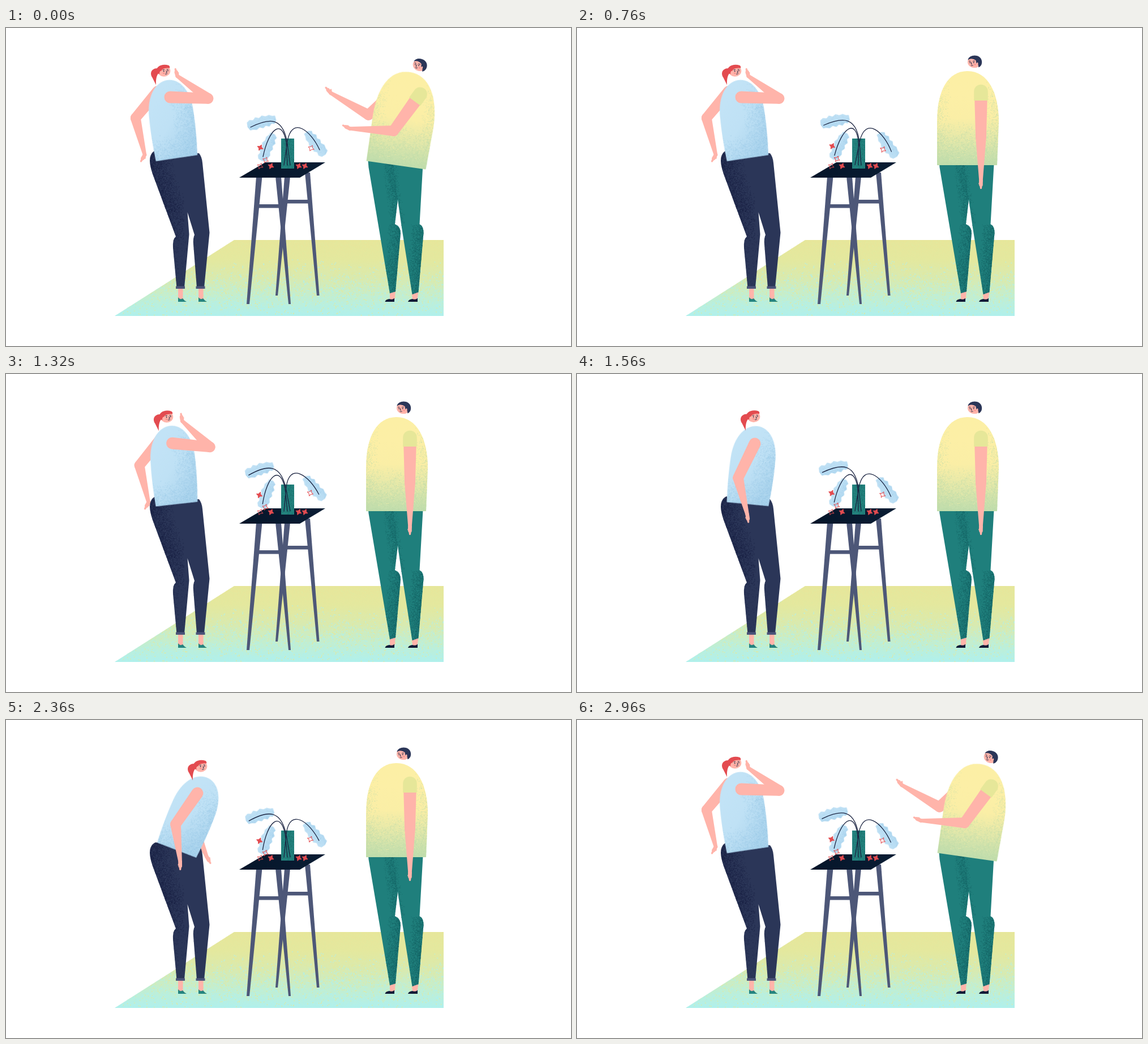
An HTML page with a canvas for the animation above (3 s loop, 998 by 561 pixels).

```html
<!DOCTYPE html>
<html>
<head>
<meta charset="utf-8">
<style>
html, body { margin: 0; width: 998px; height: 561px; overflow: hidden; background: #fff; }
canvas { display: block; }
</style>
</head>
<body>
<canvas id="stage" width="998" height="561"></canvas>
<script>
const W = 998, H = 561, LOOP = 3000, STEP = 40;
const c = document.getElementById('stage').getContext('2d');
const SKIN = '#ffb4aa', NAVY = '#2b3658', RED = '#e34b50', INK = '#1b2441';
const MAN_HIP = [689, 242], WOMAN_HIP = [301.5, 229.5];

let seed = 7;
function rnd() {
  seed = (seed + 0x6D2B79F5) | 0;
  let z = Math.imul(seed ^ (seed >>> 15), 1 | seed);
  z = (z + Math.imul(z ^ (z >>> 7), 61 | z)) ^ z;
  return ((z ^ (z >>> 14)) >>> 0) / 4294967296;
}
const rad = a => a * Math.PI / 180;
const clamp = v => Math.max(0, Math.min(1, v));
const lerp = (a, b, k) => a + (b - a) * k;
const ease = u => u < .5 ? 4 * u ** 3 : 1 - 4 * (1 - u) ** 3;
const ramp = (t, from, to) => ease(clamp((t - from) / (to - from)));

function fill(g, d, color) {
  g.fillStyle = color;
  g.fill(new Path2D(d));
}
function line(g, d, color, width) {
  g.strokeStyle = color;
  g.lineWidth = width;
  g.lineCap = g.lineJoin = 'round';
  g.stroke(new Path2D(d));
}
function fade(g, x0, y0, x1, y1, ...stops) {
  const grad = g.createLinearGradient(x0, y0, x1, y1);
  stops.forEach((s, i) => grad.addColorStop(i / (stops.length - 1), s));
  return grad;
}
function layer(draw) {
  const el = document.createElement('canvas');
  el.width = W;
  el.height = H;
  draw(el.getContext('2d'));
  return el;
}
// Random specks inside shape d; density(x, y) is the chance of each speck.
function grain(g, d, [x, y, w, h], n, color, density, size = 1) {
  g.save();
  g.clip(new Path2D(d));
  g.fillStyle = color;
  for (let i = 0; i < n; i++) {
    const px = x + rnd() * w, py = y + rnd() * h;
    if (rnd() < density(px, py)) g.fillRect(px, py, size, size);
  }
  g.restore();
}

const room = layer(g => {
  const floor = 'M403 374H773V508H192Z';
  fill(g, floor, fade(g, 0, 374, 0, 508, '#e7e69a', '#e4e89e', '#d8eab0', '#c3eecf', '#b0f0ec'));
  const box = [192, 374, 581, 134], depth = y => (y - 374) / 134;
  grain(g, floor, box, 15000, '#b0f0ec', (x, y) => clamp(depth(y) * 1.1 - .25) * .5, 1.5);
  grain(g, floor, box, 12000, '#e2e99f', (x, y) => clamp(1.1 - depth(y)) * .5, 1.5);
  grain(g, floor, box, 2000, '#b9eed8', (x, y) => x < 397 - (y - 374) * 1.4 ? .7 : 0, 1.5);

  const legs = ['M476 262H486L503 487H499Z', 'M492 262H502L480 472H476Z',
    'M528 255H537L553.5 472H549Z', 'M442 262H452.5L430 487H425Z',
    'M446 311H483V317.5H446Z', 'M497 303H534V309.5H497Z'];
  legs.forEach(d => fill(g, d, '#4d5778'));
  fill(g, 'M458 237H564L519 264H412Z', fade(g, 412, 0, 564, 0, '#051529', '#0a1d34'));
  const vase = 'M486 195H509V248H486Z';
  fill(g, vase, '#23827e');
  grain(g, vase, [486, 195, 23, 53], 700, '#1b706c', (x, y) => .25 + (x - 486) / 60);
});

const WOMAN_LEGS = 'M264 216C255 220 253 230 254.5 240Q256 250 261 263L300 368Q294 372 295 388L301.5 458H315L323.5 364L320.5 325L333 365Q330 371 331 382L337 458H350L359.5 361L347 238Q346 227 341 221Z';
const MAN_LEGS = 'M639.5 234L640.5 246L678 468L688 465L697 362Q697 350 687 346L692 303L699 352L717.5 470L728.5 466L737.5 362Q738 350 730.5 346L736.5 240Z';
const lower = layer(g => {
  for (const x of [304, 340]) {
    fill(g, `M${x} 458h8.5v18l3 6H${x}Z`, SKIN);
    fill(g, `M${x} 475q3 5 8 2q3 4 7 6H${x}Z`, '#24847f');
  }
  fill(g, WOMAN_LEGS, NAVY);
  grain(g, WOMAN_LEGS, [254, 216, 60, 160], 16000, '#19204399', (x, y) => {
    const d = x - 257 - Math.max(0, y - 250) * .37;
    return clamp(1 - d / 40) * clamp((390 - y) / 80) * .6;
  });
  grain(g, WOMAN_LEGS, [294, 365, 45, 90], 1500, '#1d254880', (x, y) => x < 304 ? .5 : .12);
  for (const x of [300, 335.5]) fill(g, `M${x} 455.5h16v4.5h-16Z`, '#4b5479');

  fill(g, 'M678 466L688 464L686.5 479L678 480Z', SKIN);
  fill(g, 'M717 468L728.5 465L726.5 479L718 480Z', SKIN);
  fill(g, 'M669.5 483Q670 479 677 478Q683 480 686 476.5V483Z', '#111a36');
  fill(g, 'M710 483Q711 479 717.5 478Q724 480 727 476.5V483Z', '#111a36');
  fill(g, MAN_LEGS, '#1f7f7c');
  grain(g, MAN_LEGS, [639, 236, 100, 234], 36000, '#155e6080', (x, y) => {
    if (y < 346) {
      const d = 684 + (y - 245) * .13 - x;
      return d > 0 ? clamp(1 - d / 20) * .6 : clamp(1 + d / 9) * .15;
    }
    const inner = 698 - (y - 350) * .09;
    const edge = x < inner ? inner : 738 - (y - 350) * .08;
    return clamp(1 - (edge - x) / 24) * .7;
  });
});

const BLOUSE = 'M264.5 229.5C263 203 262.5 175 264 150C266 112 285 91 305 91C328 91 343 115 343 150C343 180 341 205 338.5 229.5Z';
const blouse = layer(g => {
  fill(g, BLOUSE, fade(g, 270, 130, 340, 190, '#c2e3f6', '#bfe1f5', '#b0d7ef'));
  grain(g, BLOUSE, [262, 90, 84, 141], 14000, '#98c9e799', (x, y) =>
    clamp((x - 302) / 45) * .6 * clamp((y - 95) / 60) + clamp((y - 185) / 45) * .38);
});

const SHIRT = 'M636 242L636 165C636 110 655 76 690 76C726 76 745 115 745 165L742 242Z';
const shirt = layer(g => {
  fill(g, SHIRT, fade(g, 0, 76, 0, 242, '#fcefa5', '#fcefa6', '#faeea6', '#e0e7aa', '#c1deae'));
  const box = [636, 76, 110, 166];
  grain(g, SHIRT, box, 15000, '#bfdcabb0', (x, y) =>
    clamp((y - 165) / 70) * .55 + clamp((Math.abs(x - 690) - 30) / 30) * .45 * clamp((y - 85) / 50));
  grain(g, SHIRT, box, 5000, '#fcefa5', (x, y) => clamp((235 - y) / 70) * .3);
});

function about([x, y], angle, draw) {
  c.save();
  c.translate(x, y);
  c.rotate(angle);
  c.translate(-x, -y);
  draw();
  c.restore();
}
const spin = ([px, py], a, x, y) => [
  px + (x - px) * Math.cos(a) - (y - py) * Math.sin(a),
  py + (x - px) * Math.sin(a) + (y - py) * Math.cos(a)];

// Tapered segment with round ends; returns the far end.
function limb(x, y, deg, len, r0, r1) {
  const a = rad(deg);
  c.save();
  c.translate(x, y);
  c.rotate(a);
  c.beginPath();
  c.arc(0, 0, r0, Math.PI / 2, -Math.PI / 2);
  c.arc(len, 0, r1, -Math.PI / 2, Math.PI / 2);
  c.fill();
  c.restore();
  return [x + Math.cos(a) * len, y + Math.sin(a) * len];
}
function arm([x, y], [upper, fore, hand], [len0, len1], [r0, r1], thumb) {
  c.fillStyle = SKIN;
  const elbow = limb(x, y, upper, len0, r0, r1);
  const wrist = limb(...elbow, fore, len1, r1, 3.2);
  limb(...wrist, hand, 7, 3.2, 3.3);
  limb(...wrist, hand, 13, 3.2, 1.6);
  limb(...wrist, hand + thumb, 6, 2.2, 1.2);
}

function star(x, y, hollow) {
  c.beginPath();
  for (let i = 0; i < 8; i++) {
    const r = i % 2 ? 2.5 : 5.4, a = i * Math.PI / 4 + .42;
    c.lineTo(x + r * Math.cos(a), y + r * Math.sin(a));
  }
  c.closePath();
  c.lineWidth = 1;
  c.lineJoin = 'round';
  c.fillStyle = RED;
  c.strokeStyle = RED;
  if (!hollow) c.fill();
  c.stroke();
}

const LEAF = 'M0 -3L4 -8L9 -6L14 -10L20 -7L25 -10L31 -7L37 -10L43 -8L48 -8L51 -1L50 6L45 9L39 7L34 11L28 8L22 11L16 8L10 9L5 6L0 5Z';
const leaf = layer(g => {
  g.translate(10, 20);
  const tint = fade(g, 0, -10, 0, 10, '#b2d9f1', '#c0e1f5');
  fill(g, LEAF, tint);
  line(g, LEAF, tint, 1.2);
  grain(g, LEAF, [0, -12, 54, 24], 450, '#98c9e799', (x, y) => .12 + clamp(-y / 24));
});
function plant(t) {
  about([498, 242], -.055 * Math.sin(t / 1000 * 2 * Math.PI), () => {
    for (const [x, y, deg] of [[476, 160, 165], [472, 187, 114], [531, 184, 51]]) {
      c.save();
      c.translate(x, y);
      c.rotate(rad(deg));
      c.drawImage(leaf, -10, -20);
      c.restore();
    }
    line(c, 'M432 175C462 160 492 152 498 212L502 242M454 227C464 178 488 158 495 202L497 242M554 215C538 180 505 155 497 200L491 242', INK, 1.3);
    star(449, 211);
    star(458.5, 233, true);
    star(539, 212, true);
  });
  star(449, 243.5, true);
  for (const x of [468, 517, 528]) star(x, 243.5);
}

function oval(x, y, rx, ry, color) {
  c.fillStyle = color;
  c.beginPath();
  c.ellipse(x, y, rx, ry, 0, 0, 7);
  c.fill();
}

function manHead() {
  oval(702, 60, 12, 10.3, SKIN);
  fill(c, 'M690.5 56.5C692 46 713 45 715 58C716 64 713 68 709.5 69.5L708.5 64Q709 60 706.5 61L705.5 63L704.5 57Q697 52 690.5 56.5Z', NAVY);
  line(c, 'M692.5 58.3l2.5 .4M699.5 58.5l3 -.3M697 60.5l-.8 3.3h1.4M696 66.3q2 .8 3.5 -.5', INK, .9);
  oval(694.3, 61, .9, .9, INK);
  oval(700.8, 61, .9, .9, INK);
  oval(703, 64.5, 1.6, 1.3, '#f58e8b');
}
function man(t) {
  const up = ramp(t, 560, 760) - ramp(t, 2770, 2960);
  const lean = rad(lerp(8.1, 0, up));
  const wave = t < 560 ? 9.5 * Math.sin(Math.PI * t / 560) ** 2 : 0;
  const angles = list => list.map((a, i) => lerp(a + (i ? wave : 0), 90, up));
  const front = angles([126, 183, 205]);
  const shoulder = spin(MAN_HIP, lean, 713.5, 112);
  return {
    back() {
      arm(spin(MAN_HIP, lean, 672, 105), angles([136, 210, 228]), [71, 77], [8.5, 9.4], 45);
    },
    body() {
      about(MAN_HIP, lean, () => {
        c.drawImage(shirt, 0, 0);
        // The head tips further than the trunk.
        about([693, 84], lean, manHead);
      });
      arm(shoulder, front, [80, 77.5], [11.6, 9.4], 30);
      c.save();
      c.translate(...shoulder);
      c.rotate(rad(front[0]));
      fill(c, 'M16 -12.3H0A12.3 12.3 0 0 0 0 12.3H16Z', '#e6e799');
      c.restore();
    }
  };
}

function womanHead(x, y) {
  c.save();
  c.translate(x, y);
  fill(c, 'M-9 -4C-20 -6 -26 3 -20 12L-13.5 25C-14 16 -13 8 -8 3Z', RED);
  oval(0.5, 0.3, 11.3, 10, SKIN);
  fill(c, 'M-13 3C-15 -8 -2 -13.5 9 -9.5C12 -7 11 -4 9 -5C3 -5 -3 -4 -4 0C-6 0 -8 2 -7 5Q-10 6 -13 3Z', RED);
  line(c, 'M-1.5 -1.6l2.6 -.5M5.6 -2.5l2.2 .2M4.6 -.2l1.2 3.2h-1.5M2.8 5.7q2 .6 3.4 -.7', INK, .9);
  oval(.2, .7, .9, .9, INK);
  oval(7.4, -.2, .9, .9, INK);
  oval(0, 4, 1.6, 1.3, '#f58e8b');
  c.restore();
}

const POSES = {
  back: { body: [-8.5, 278.5, 75.5], front: [290, 122, 2, -144, -106], rear: [268, 112, 130, 76, 120] },
  stand: { body: [5.4, 311.5, 75], front: [314, 123, 116, 76, 82], rear: [310, 125, 105, 80, 80] },
  bend: { body: [21, 343.5, 81.5], front: [338, 129, 125, 83, 90], rear: [340, 119, 100, 68, 60] }
};
function woman(t) {
  let from, to, k;
  if (t < 2230) [from, to, k] = ['back', 'stand', ramp(t, 1200, 1560)];
  else if (t < 2560) [from, to, k] = ['stand', 'bend', ramp(t, 2230, 2360)];
  else [from, to, k] = ['bend', 'back', ramp(t, 2560, 2780)];
  const mix = (part, q) => POSES[from][part].map((v, i) => lerp(v, POSES[to][part][i], q));
  // The arms trail behind the body.
  const [tilt, hx, hy] = mix('body', k), late = k ** 1.8;
  const reach = (part, radii, thumb, len) => {
    const [x, y] = mix(part, k), [, , ...angles] = mix(part, late);
    arm([x, y], angles, len, radii, thumb);
  };
  return {
    back() { reach('rear', [10, 9], -35, [61, 67]); },
    body() {
      about(WOMAN_HIP, rad(tilt), () => c.drawImage(blouse, 0, 0));
      womanHead(hx, hy);
      reach('front', [10.5, 9.4], 30, [67, 67]);
    }
  };
}

function frame() {
  const now = performance.now() % LOOP, t = now - now % STEP;
  const he = man(t), she = woman(t);
  c.fillStyle = '#fff';
  c.fillRect(0, 0, W, H);
  c.drawImage(room, 0, 0);
  plant(t);
  he.back();
  she.back();
  c.drawImage(lower, 0, 0);
  he.body();
  she.body();
  requestAnimationFrame(frame);
}
frame();
</script>
</body>
</html>
```
